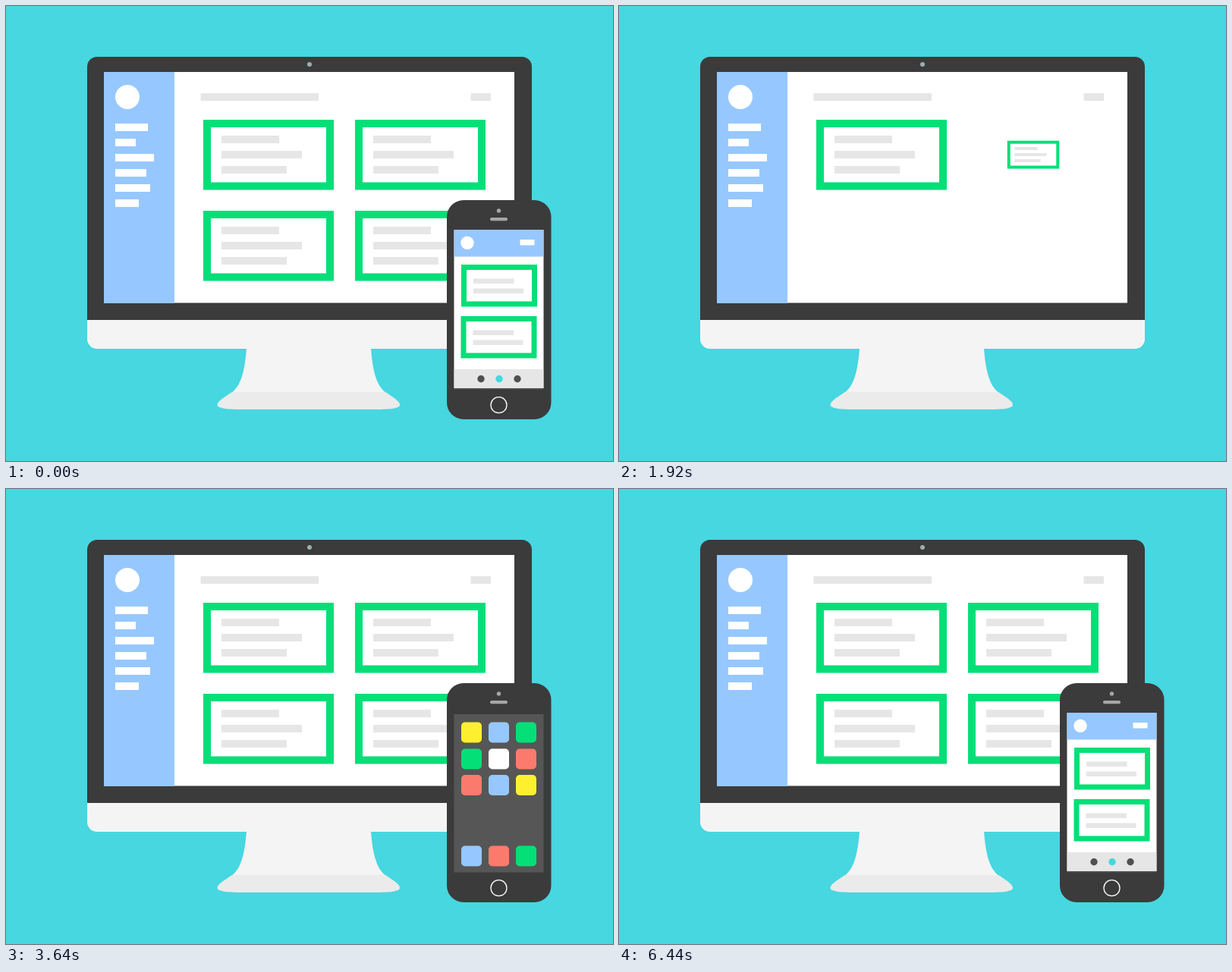
An HTML page with a canvas for the animation above (7 s loop, 800x600 px).

```html
<!DOCTYPE html>
<html lang="en">
<head>
<meta charset="utf-8">
<title>Desktop and phone layout</title>
<style>
  html, body { margin: 0; width: 100%; height: 100%; overflow: hidden; background: #46d7e0; }
  canvas { display: block; width: 800px; height: 600px; }
</style>
</head>
<body>
<canvas id="stage" width="800" height="600"></canvas>
<script>
const ctx = document.getElementById('stage').getContext('2d');
const LOOP = 7000, TICK = 40;

const SKY = '#46d7e0', DARK = '#3b3b3b', SHELL = '#f4f4f4', BASE = '#ebebeb', WHITE = '#fff';
const BLUE = '#96c8ff', GREEN = '#05df78', GREY = '#e6e6e6', YELLOW = '#fff02f', RED = '#fa7b6d';
const DOT = [80, 80, 80], ACTIVE = [70, 215, 224];

// One value per tick, beginning at the start of each move
const POP = [0.263, 0.65, 1, 1.06, 1];
const GROW = [0.3, 0.62, 0.84, 0.95, 1];
const SLIDE = [0.12, 0.42, 0.76, 0.94, 1];
const FADE = [0.2, 0.4, 0.6, 0.8, 1];
const PRESS = [0.96, 0.9, 0.85, 0.82, 0.82, 0.82, 0.86, 0.92, 0.97, 1];
const PHONE_OUT = [1.03, 1.05, 0.75, 0.35, 0];
const SCREEN_OUT = [1.006, 0.94, 0.7, 0.35, 0];

const lerp = (a, b, p) => a + (b - a) * p;
const smooth = (t, from, to) => {
  const p = Math.min(1, Math.max(0, (t - from) / (to - from)));
  return (1 - Math.cos(Math.PI * p)) / 2;
};

function track(t, start, values, before = 0) {
  const x = (t - start) / TICK;
  if (x < 0) return before;
  const i = Math.floor(x);
  if (i >= values.length - 1) return values[values.length - 1];
  return lerp(values[i], values[i + 1], x - i);
}

function rect(x, y, w, h, color, radius = 0) {
  ctx.fillStyle = color;
  ctx.beginPath();
  ctx.roundRect(x, y, w, h, radius);
  ctx.fill();
}

function circle(x, y, r, color) {
  ctx.fillStyle = color;
  ctx.beginPath();
  ctx.arc(x, y, r, 0, Math.PI * 2);
  ctx.fill();
}

function shape(path, color) {
  ctx.fillStyle = color;
  ctx.fill(new Path2D(path));
}

function scaled(cx, cy, s, draw) {
  if (s <= 0) return;
  ctx.save();
  ctx.translate(cx, cy);
  ctx.scale(s, s);
  ctx.translate(-cx, -cy);
  draw();
  ctx.restore();
}

function clipped(x, y, w, h, draw) {
  ctx.save();
  ctx.beginPath();
  ctx.rect(x, y, w, h);
  ctx.clip();
  draw();
  ctx.restore();
}

function frame(x, y, w, h, line) {
  ctx.strokeStyle = GREEN;
  ctx.lineWidth = line;
  ctx.strokeRect(x + line / 2, y + line / 2, w - line, h - line);
}

function wideCard(x, y) {
  frame(x, y, 172, 92.5, 10);
  [76, 106, 86].forEach((w, i) => rect(x + 24, y + 21 + i * 20, w, 10, GREY));
}

function smallCard(x, y) {
  frame(x, y, 100, 55.5, 7);
  [53.5, 66].forEach((w, i) => rect(x + 16, y + 18.5 + i * 13, w, 6.5, GREY));
}

function desktop(t) {
  shape('M317 451C315 482 309 501 298 509.5H500C489 501 483 482 481 451Z', SHELL);
  shape('M298 509C284 518 278.500 522 278.500 526C278.500 531 294 532 310 532H488' +
        'C504 532 519 531 519 526C519 522 514 518 500 509Z', BASE);
  rect(107, 67, 586, 347, DARK, [13, 13, 0, 0]);
  rect(107, 414, 586, 38, SHELL, [0, 0, 13, 13]);
  circle(400, 77, 3, '#9bb0b1');
  rect(129, 87, 541, 304.5, WHITE);

  clipped(129, 87, 541, 305, () => {
    const side = track(t, 1000, GROW.slice(1));
    rect(129 - 93 * (1 - side), 87, 93, 305, BLUE);
  });
  scaled(160, 120, track(t, 1200, POP), () => circle(160, 120, 16, WHITE));

  const grow = i => track(t, 1400 + i * 17, GROW);
  [43, 27, 51, 41, 46, 31].forEach((w, i) => rect(144, 155 + i * 20, w * grow(i), 10, WHITE));
  rect(256.5, 115, 155.5 * grow(6), 10, GREY);
  rect(612.5, 115, 26.5 * grow(7), 10, GREY);

  for (let i = 0; i < 4; i++) {
    const x = 260 + (i % 2) * 200, y = 150 + (i >> 1) * 120;
    scaled(x + 86, y + 46, track(t, 1840 + i * 66, POP), () => wideCard(x, y));
  }
}

function icons(t) {
  const rows = [307.5, 342.5, 377, 470.5];
  const colors = [YELLOW, BLUE, GREEN, GREEN, WHITE, RED, RED, BLUE, YELLOW, BLUE, RED, GREEN];
  colors.forEach((color, i) => {
    const x = 600 + (i % 3) * 36, y = rows[Math.floor(i / 3)];
    const press = i === 4 ? track(t, 3880, PRESS, 1) : 1;
    scaled(x + 13.5, y + 13.5, track(t, 3280 + i * 18, POP) * press,
      () => rect(x, y, 27, 27, color, 5));
  });
}

function app(t) {
  const open = track(t, 4400, SLIDE);
  if (!open) return;
  rect(lerp(636, 590.5, open), lerp(342.5, 295, open), lerp(27, 118, open),
    lerp(27, 209, open), WHITE, 5 * (1 - open));

  clipped(590.5, 295, 118, 211, () => {
    const rise = smooth(t, 4955, 5285);
    const swipe = track(t, 6280, SLIDE) * 118;
    if (rise > 0) {
      [0, 118].forEach((page, i) => {
        if (i && !swipe) return;
        const x = 599.5 + page - swipe;
        smallCard(x + i * 0.5, lerp(507, 341, rise));
        smallCard(x, lerp(507, 409, rise));
      });
    }
  });

  clipped(590.5, 295, 118, 209, () => {
    const bars = track(t, 4800, SLIDE);
    const top = 36 * (bars - 1), low = 26 * (1 - bars);
    rect(590.5, 295 + top, 118, 35.5, BLUE);
    circle(608, 312.3 + top, 8.7, WHITE);
    rect(677.5, 308 + top, 19, 7.5, WHITE);

    rect(590.5, 479 + low, 118, 25, GREY);
    const next = track(t, 5880, FADE);
    [1 - next, next, 0].forEach((on, i) => {
      const rgb = DOT.map((c, k) => Math.round(lerp(c, ACTIVE[k], on)));
      circle(626 + i * 24, 491.8 + low, 4.7, `rgb(${rgb})`);
    });
  });
}

function phone(t) {
  rect(581, 256, 137.5, 289, DARK, 22);
  circle(649.5, 270, 2.7, '#a6a6a6');
  rect(638, 279, 23, 4.2, '#a6a6a6', 2);
  rect(590.5, 297, 118, 208.5, '#565656');
  icons(t);
  app(t);
  ctx.strokeStyle = WHITE;
  ctx.lineWidth = 1.3;
  ctx.beginPath();
  ctx.arc(649.5, 526.2, 10.5, 0, Math.PI * 2);
  ctx.stroke();
}

function render(t) {
  const leaving = t < 680;
  const content = leaving ? t + LOOP : t;
  const big = leaving ? track(t, 240, SCREEN_OUT, 1) : track(t, 680, POP);
  const small = leaving ? track(t, 80, PHONE_OUT, 1) : track(t, 3080, POP);
  ctx.fillStyle = SKY;
  ctx.fillRect(0, 0, 800, 600);
  scaled(400, 300, big, () => desktop(content));
  scaled(650, 400, small, () => phone(content));
}

const begin = performance.now();
function loop() {
  const t = (performance.now() - begin + 1) % LOOP;
  render(Math.floor(t / TICK) * TICK);
  requestAnimationFrame(loop);
}
loop();
</script>
</body>
</html>
```
